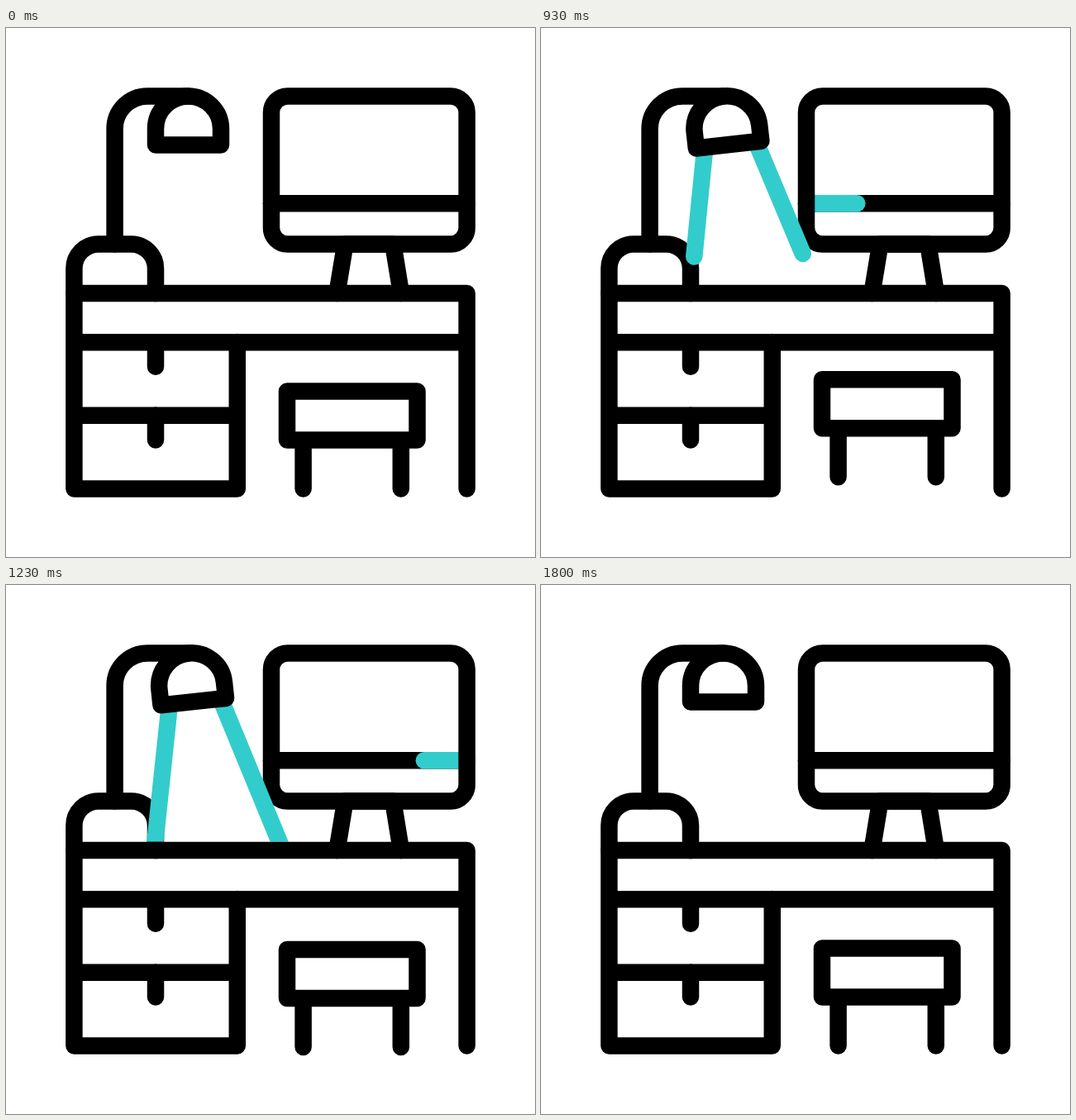
Recreate the animation shown at these times as an HTML page. Size 640x640 px, loop 2.5 s.

```html
<!DOCTYPE html>
<html lang="en">
<head>
<meta charset="utf-8">
<title>Desk with lamp</title>
<style>
  html, body { margin: 0; width: 100%; height: 100%; overflow: hidden; background: #fff; }
  svg { display: block; width: 100%; height: 100%; }
  .ink { fill: none; stroke: #000; stroke-width: 20.5; stroke-linecap: round; stroke-linejoin: round; }
  .teal { stroke: #33cccc; }
</style>
</head>
<body>
<svg class="ink" viewBox="0 0 640 640">
  <clipPath id="aboveDesk"><rect width="640" height="310.8"/></clipPath>

  <!-- monitor -->
  <path d="M321 212.3H557.6"/>
  <path id="bar" class="teal"/>
  <rect x="321" y="82.4" width="236.6" height="179.1" rx="19.7"/>
  <path d="M400.5 321 410.3 261.5H468.3L478 321"/>

  <!-- lamp -->
  <path d="M131.6 261.5V122A39.5 39.5 0 0 1 171 82.4H220.5"/>
  <path d="M82.4 321V291A29.5 29.5 0 0 1 112 261.5H151.4A29.5 29.5 0 0 1 181 291V321"/>
  <g clip-path="url(#aboveDesk)">
    <g class="tilt teal">
      <path id="rayLeft"/>
      <path id="rayRight"/>
    </g>
  </g>
  <path class="tilt" d="M181 141.5H260V122A39.5 39.5 0 0 0 181 122Z"/>

  <!-- desk -->
  <path d="M82.4 321H557.6V557.5M82.4 321V557.5H279.8V380M82.4 380.2H557.6M82.4 468.7H279.8"/>
  <path d="M181 380.2V409.7M181 468.7V498.4"/>

  <!-- stool -->
  <path id="stool" d="M340 439.4H497.5V498.5H340ZM359.6 498.5V557.5M477.8 498.5V557.5"/>
</svg>
<script>
  const LOOP = 2500, FPS = 30;
  const $ = id => document.getElementById(id);
  const heads = document.querySelectorAll('.tilt');

  // Keys are [tick, value], eased in and out between neighbours.
  const tracks = {
    tilt: [[22, 0], [32.7, -10.9], [42, 0]],
    stool: [[22, 0], [29, -15], [35.5, 4.2], [38, 0]],
    ray: [[21, 0], [32, 1], [46, 1], [54, 0]],
    barEnd: [[24, 0], [36, 1]],
    barStart: [[31, 0], [39.6, 1]]
  };

  const rays = [
    { el: $('rayLeft'), x: 191, y: 144.1, angle: -12.1, length: 186 },
    { el: $('rayRight'), x: 253.7, y: 142.3, angle: 16.3, length: 209 }
  ];

  function valueAt(keys, tick) {
    if (tick <= keys[0][0]) return keys[0][1];
    for (let i = 1; i < keys.length; i++) {
      const [t0, a] = keys[i - 1], [t1, b] = keys[i];
      if (tick < t1) {
        const u = (tick - t0) / (t1 - t0);
        return a + (b - a) * u * u * (3 - 2 * u);
      }
    }
    return keys[keys.length - 1][1];
  }

  function setLine(el, visible, x1, y1, x2, y2) {
    el.setAttribute('d', visible ? `M${x1} ${y1}L${x2} ${y2}` : '');
  }

  function draw(ms) {
    const tick = Math.floor((ms % LOOP + 5) * FPS / 1000);
    const at = name => valueAt(tracks[name], tick);

    const turn = `rotate(${at('tilt')} 220.5 82.4)`;
    heads.forEach(el => el.setAttribute('transform', turn));
    $('stool').setAttribute('transform', `translate(0 ${at('stool')})`);

    const grown = at('ray');
    for (const { el, x, y, angle, length } of rays) {
      const a = angle * Math.PI / 180, len = length * grown;
      setLine(el, grown > 0, x, y, x + len * Math.sin(a), y + len * Math.cos(a));
    }

    const from = at('barStart'), to = at('barEnd');
    setLine($('bar'), to > from, 321 + 236.6 * from, 212.3, 321 + 236.6 * to, 212.3);
  }

  const start = performance.now();
  function loop() {
    draw(performance.now() - start);
    requestAnimationFrame(loop);
  }
  loop();
</script>
</body>
</html>
```
